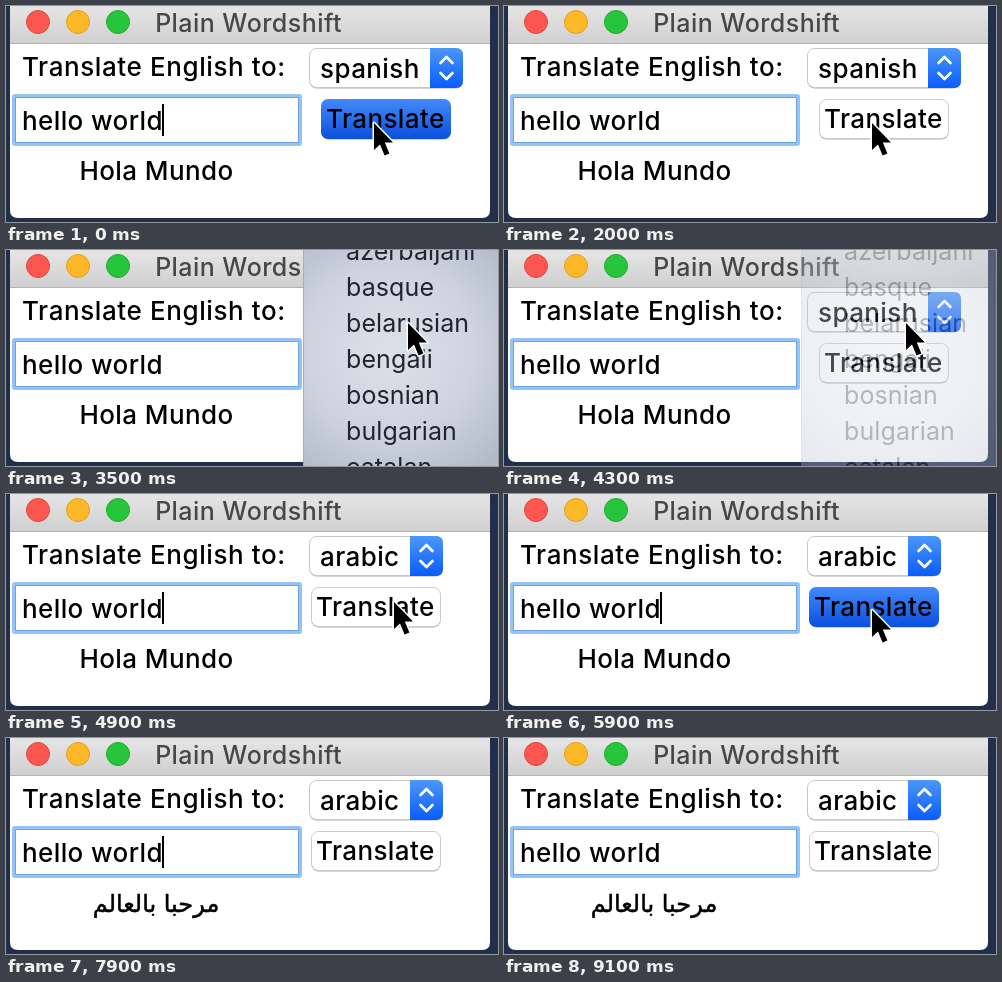
Animation, 492 px wide and 216 px high, one loop 9.2 s. Source, as an HTML page:

```html
<!DOCTYPE html>
<html lang="en">
<head>
<meta charset="utf-8">
<title>Plain Wordshift</title>
<style>
  html, body { margin: 0; width: 100%; height: 100%; overflow: hidden; background: #212f4b; }
  svg { display: block; width: 492px; height: 216px; }
  text { font: 450 26px Inter, "Open Sans", sans-serif; letter-spacing: .4px; fill: #000; white-space: pre; }
  .title { font-size: 25px; letter-spacing: .45px; fill: #474747; }
  .label { letter-spacing: .6px; }
  .arabic { font: 24px "DejaVu Sans", sans-serif; letter-spacing: 0; stroke: #000; stroke-width: .5; }
  .menu text { font-size: 25px; font-weight: 400; letter-spacing: .1px; fill: #20242c; }
  .chevron { fill: none; stroke: #fff; stroke-width: 2.6; stroke-linecap: round; stroke-linejoin: round; }

  /* Percentages are multiples of 100 ms in a 9200 ms loop. */
  .caret, .button, .pressed, .menu, .list, .pointer, .before, .after, .reply-a, .reply-b {
    animation: 9200ms step-end infinite;
  }
  .caret { animation-name: blink; }
  .button { animation-name: shift; }
  .pressed { animation-name: press; }
  .menu { animation-name: menu; }
  .list { animation-name: scroll; }
  .pointer { animation-name: point; }
  .before { animation-name: before; }
  .after { animation-name: after; }
  .reply-a { animation-name: reply-a; }
  .reply-b { animation-name: reply-b; }

  @keyframes blink {
    0%, 25%, 50%, 82.608%, 92.391% { opacity: 1; }
    21.739%, 31.521%, 79.347%, 89.13%, 98.913%, 100% { opacity: 0; }
  }
  @keyframes shift {
    0% { transform: translateX(315px); }
    50%, 100% { transform: translateX(305px); }
  }
  @keyframes press {
    0%, 64.13% { opacity: 1; }
    21.739%, 79.347%, 100% { opacity: 0; }
  }
  @keyframes menu {
    0% { opacity: 0; }
    32.608% { opacity: 1; }
    43.478% { opacity: 1; animation-timing-function: steps(6, jump-start); }
    50%, 100% { opacity: 0; }
  }
  @keyframes scroll {
    0% { transform: translateY(-216px); }
    32.608% { transform: translateY(-216px); animation-timing-function: steps(6, jump-start); }
    39.13%, 100% { transform: none; }
  }
  @keyframes point {
    0% { transform: translate(368px, 117px); opacity: 1; }
    28.26% { transform: translate(368px, 117px); opacity: 1; animation-timing-function: steps(4, jump-start); }
    32.608% { transform: translate(402px, 73px); opacity: 1; }
    50% { transform: translate(402px, 73px); opacity: 1; animation-timing-function: steps(4, jump-start); }
    54.347% { transform: translate(388px, 108px); opacity: 1; animation-timing-function: steps(2, jump-start); }
    56.521% { transform: translate(368px, 116px); opacity: 1; }
    68.478%, 100% { transform: translate(368px, 116px); opacity: 0; }
  }
  @keyframes before { 0% { opacity: 1; } 50%, 100% { opacity: 0; } }
  @keyframes after { 0% { opacity: 0; } 50%, 100% { opacity: 1; } }
  @keyframes reply-a { 0% { opacity: 1; } 79.347%, 100% { opacity: 0; } }
  @keyframes reply-b { 0% { opacity: 0; } 79.347%, 100% { opacity: 1; } }
</style>
</head>
<body>
<svg viewBox="0 0 492 216" xmlns="http://www.w3.org/2000/svg">
  <defs>
    <linearGradient id="bar" x2="0" y2="1">
      <stop stop-color="#e5e5e5"/><stop offset="1" stop-color="#d0d0d0"/>
    </linearGradient>
    <linearGradient id="knob" x2="0" y2="1">
      <stop stop-color="#4c97f8"/><stop offset="1" stop-color="#0a5cff"/>
    </linearGradient>
    <linearGradient id="down" x2="0" y2="1">
      <stop stop-color="#438afa"/><stop offset="1" stop-color="#0a50df"/>
    </linearGradient>
    <radialGradient id="glass" gradientUnits="userSpaceOnUse" cx="385" cy="100" r="150">
      <stop stop-color="#dce0e8"/><stop offset=".55" stop-color="#ced4df"/><stop offset="1" stop-color="#b2bac9"/>
    </radialGradient>
    <path id="chevrons" class="chevron" d="M-6 -5 L0 -11 L6 -5 M-6 5 L0 11 L6 5"/>
  </defs>

  <rect width="492" height="216" fill="#212f4b"/>
  <path d="M4 0H484V204Q484 212 476 212H12Q4 212 4 204Z" fill="#fff"/>
  <rect x="4" width="480" height="37" fill="url(#bar)"/>
  <rect x="4" y="37" width="480" height="1" fill="#b3b3b3"/>
  <circle cx="32" cy="16" r="11.5" fill="#fc5650" stroke="#e2453f"/>
  <circle cx="72" cy="16" r="11.5" fill="#fdb827" stroke="#dfa023"/>
  <circle cx="112" cy="16" r="11.5" fill="#27c53b" stroke="#1dac2c"/>
  <text class="title" x="242.5" y="26" text-anchor="middle">Plain Wordshift</text>

  <text class="label" x="16" y="70">Translate English to:</text>
  <rect x="6" y="88" width="290" height="52" rx="3" fill="#95c2f8"/>
  <rect x="9.5" y="91.5" width="283" height="45" fill="#fff" stroke="#6ba4e6"/>
  <text x="16" y="124">hello world</text>
  <rect class="caret" x="156" y="98" width="2" height="32" fill="#000"/>

  <text class="reply-a" x="150.5" y="174" text-anchor="middle">Hola Mundo</text>
  <text class="reply-b arabic" x="150" y="174" text-anchor="middle" direction="rtl">مرحبا بالعالم</text>

  <g class="before">
    <rect x="303.5" y="43.5" width="153" height="39" rx="7" fill="#b4b4b4"/>
    <rect x="303.5" y="42.5" width="153" height="39" rx="7" fill="#fff" stroke="#c6c6c6"/>
    <path d="M424 42H450Q457 42 457 49V75Q457 82 450 82H424Z" fill="url(#knob)"/>
    <use href="#chevrons" x="440.5" y="62"/>
    <text x="314" y="72">spanish</text>
  </g>
  <g class="after">
    <rect x="303.5" y="43.5" width="133" height="39" rx="7" fill="#b4b4b4"/>
    <rect x="303.5" y="42.5" width="133" height="39" rx="7" fill="#fff" stroke="#c6c6c6"/>
    <path d="M404 42H430Q437 42 437 49V75Q437 82 430 82H404Z" fill="url(#knob)"/>
    <use href="#chevrons" x="420.5" y="62"/>
    <text x="314" y="72">arabic</text>
  </g>

  <g class="button">
    <rect x=".5" y="94.5" width="129" height="39" rx="7" fill="#a9a9a9"/>
    <rect x=".5" y="93.5" width="129" height="39" rx="7" fill="#fff" stroke="#cbcbcb"/>
    <rect class="pressed" y="93" width="130" height="40" rx="7" fill="url(#down)"/>
    <text x="5" y="122">Translate</text>
  </g>

  <g class="menu">
    <rect x="297" width="195" height="216" fill="#a7aebb"/>
    <rect x="298" width="194" height="216" fill="url(#glass)"/>
    <g class="list">
      <text x="340" y="10">azerbaijani</text>
      <text x="340" y="46">basque</text>
      <text x="340" y="82">belarusian</text>
      <text x="340" y="118">bengali</text>
      <text x="340" y="154">bosnian</text>
      <text x="340" y="190">bulgarian</text>
      <text x="340" y="226">catalan</text>
      <text x="340" y="262">cebuano</text>
      <text x="340" y="298">chichewa</text>
      <text x="340" y="334">corsican</text>
      <text x="340" y="370">croatian</text>
      <text x="340" y="406">czech</text>
      <text x="340" y="442">danish</text>
    </g>
  </g>

  <g class="pointer">
    <path d="M0 0V27L6 21.5L10.6 32.5L15.4 30.4L10.8 19.6H19Z" fill="#000" stroke="#fff" stroke-width="3" paint-order="stroke" stroke-linejoin="round"/>
  </g>
</svg>
</body>
</html>
```
